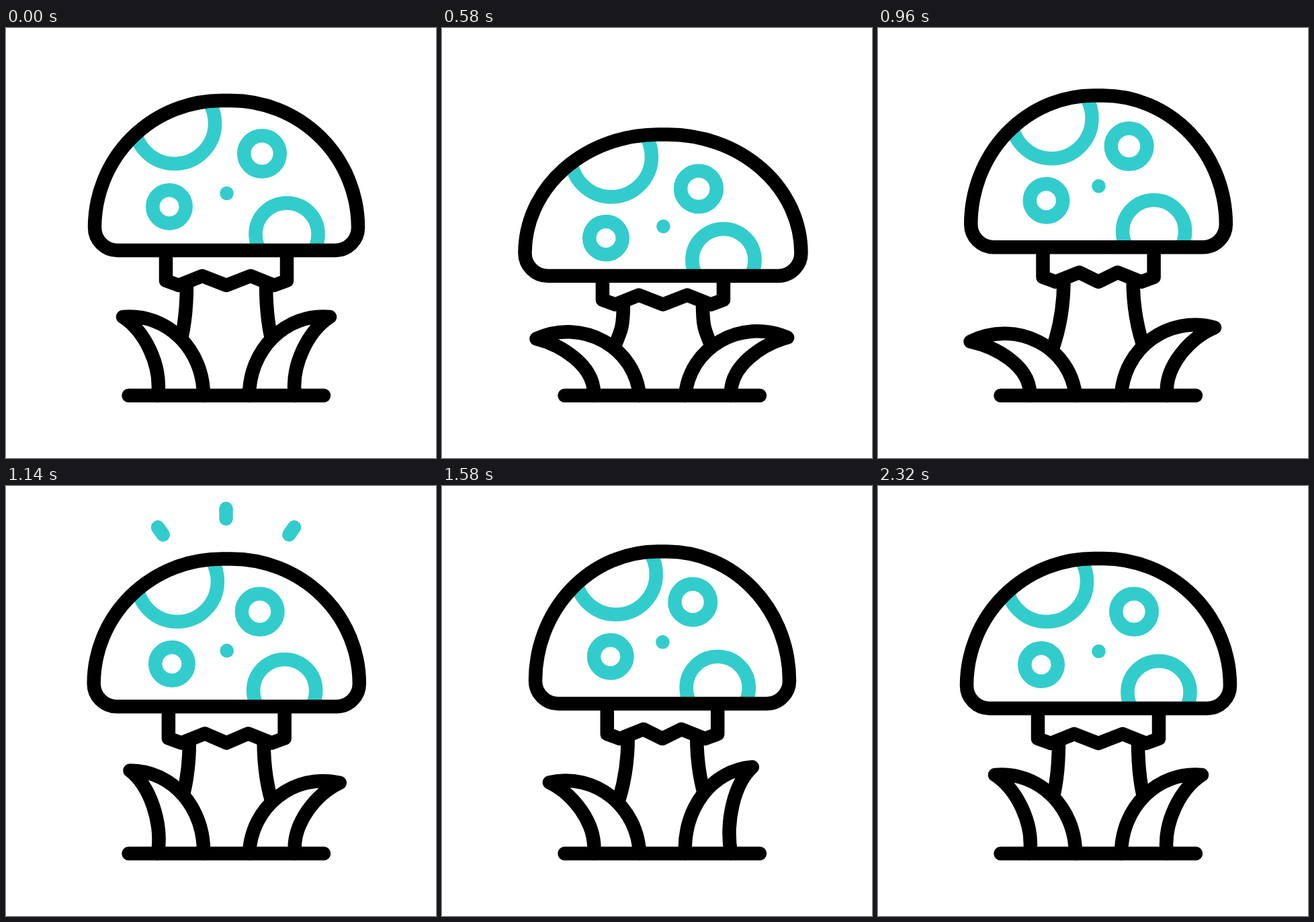
Animation, 640 px wide and 640 px high, one loop 2400 ms. Source, as an HTML page:

```html
<!DOCTYPE html>
<html lang="en">
<head>
<meta charset="utf-8">
<title>Bouncing mushroom</title>
<style>
  html, body { margin: 0; width: 100%; height: 100%; overflow: hidden; background: #fff; }
  svg { display: block; width: 100%; height: 100%; }
  .ink { fill: none; stroke: #000; stroke-width: 20.5; stroke-linecap: round; stroke-linejoin: round; }
  .solid { fill: #fff; }
  .teal { fill: none; stroke: #33cccc; stroke-width: 20.5; stroke-linecap: round; }
  .dot { fill: #33cccc; stroke: none; }
</style>
</head>
<body>
<svg viewBox="0 0 640 640">
  <defs><clipPath id="inside"><path id="clip"/></clipPath></defs>
  <g id="rays" class="teal"><path/><path/><path/></g>
  <path id="stem" class="ink"/>
  <path id="leafL" class="ink solid"/>
  <path id="leafR" class="ink solid"/>
  <path class="ink" d="M182.5 547H473"/>
  <path id="ring" class="ink solid"/>
  <path id="fill" fill="#fff"/>
  <g class="teal" clip-path="url(#inside)">
    <circle r="60"/><circle r="26.8"/><circle r="24.7"/><circle r="46.6"/><circle r="10.3" class="dot"/>
  </g>
  <path id="cap" class="ink"/>
</svg>
<script>
const LOOP = 2400, MID = 328, SIDES = [-1, 1];
const $ = id => document.getElementById(id);
const mix = (a, b, k) => a + (b - a) * k;
const draw = (el, d) => el.setAttribute('d', d);

// Eases in and out between [time, value] keys.
const keyed = (...keys) => t => {
  const i = keys.findIndex(k => k[0] > t);
  if (i < 1) return keys[i < 0 ? keys.length - 1 : 0][1];
  const [t0, a] = keys[i - 1], [t1, b] = keys[i];
  const u = (t - t0) / (t1 - t0);
  return mix(a, b, u * u * (3 - 2 * u));
};

// The body moves through rest, squash, stretch, landing, stretch, rest.
const BEATS = [200, 640, 1010, 1260, 1570, 1940];
const weight = (...on) => keyed(...BEATS.map((t, i) => [t, on.includes(i) ? 1 : 0]));
const squash = weight(1), stretch = weight(2, 4), land = weight(3);

// Leaf angles in degrees; the tips lag while settling.
const swayL = keyed([120, 0], [880, 28.7], [1140, -5], [1600, 7.3], [1980, -4], [2320, 0]);
const swayR = keyed([100, 0], [560, 18], [1140, 7.6], [1580, -9.4], [1980, -4], [2320, 0]);
const lag = keyed([1600, 0], [1980, 7.5], [2320, 0]);

// Ends of the rays, 0 near the cap and 1 far out.
const rayHead = keyed([1020, 0], [1230, 1]);
const rayTail = keyed([1040, 0], [1340, 1]);

const SPOTS = [[251, 142], [381, 187], [243, 266], [418, 307], [328.5, 246]];
const dots = document.querySelectorAll('circle');

// Turns a leaf point around the root.
function turn(x, y, deg, scale = 1) {
  const a = -deg * Math.PI / 180, dx = (x - 255) * scale, dy = (y - 547) * scale;
  return [255 + dx * Math.cos(a) - dy * Math.sin(a), 547 + dx * Math.sin(a) + dy * Math.cos(a)];
}

function leaf(el, sway, curl, flip) {
  const points = [
    [294, 547],
    turn(294, 479, sway * .3),
    turn(240, 424, sway * .75),
    turn(174, 430, sway + curl, 1 - curl / 150),
    turn(205, 450, sway),
    turn(232, 500, sway * .25),
    [226, 547]
  ].map(([x, y]) => [flip ? 2 * MID - x : x, y]);
  draw(el, `M${points[0]}C${points.slice(1, 4)}C${points.slice(4)}`);
}

function render(t) {
  const s = squash(t), p = stretch(t), l = land(t);
  const top = 108 + 53 * s - 10.5 * p + 10 * l;
  const bottom = 331 + 40 * s - 7 * p + l;
  const half = 196 + 10 * s - 7 * p + 9 * l;
  const drop = 30 * s - 7 * p + 5 * l;
  const inset = 7.8 * p;
  const cx = MID + s + l / 2;

  const r = 34, flat = 7, left = cx - half, right = cx + half, side = bottom - r;
  const arc = `A${half - flat} ${side - top} 0 0 1 `, corner = `A${r} ${r} 0 0 1 `;
  const cap = `M${left + r} ${bottom}${corner}${left} ${side}${arc}${cx - flat} ${top}`
    + `H${cx + flat}${arc}${right} ${side}${corner}${right - r} ${bottom}Z`;
  for (const id of ['cap', 'clip', 'fill']) draw($(id), cap);

  // Spots keep their share of the cap height; those halfway up bulge more.
  const bulge = 14 * s - 11 * p + 12 * l;
  SPOTS.forEach(([x, y], i) => {
    const f = (y - 108) / 223;
    const pull = Math.max(-1, Math.min(1, (MID - x) / 40));
    dots[i].setAttribute('cx', x + cx - MID + inset * pull);
    dots[i].setAttribute('cy', mix(top, bottom, f) + bulge * (4 * f * (1 - f) - .45));
  });

  const zig = k => [[90, bottom - drop], [90, 376], [71, 383], [36, 369]]
    .map(([d, y]) => [cx + k * (d - inset), y + drop]);
  draw($('ring'), 'M' + [...zig(-1), [cx, 383 + drop], ...zig(1).reverse()].join('L'));

  draw($('stem'), SIDES.map(k => {
    const x = (d, amount) => cx + k * (d - inset * amount);
    return `M${x(59, 1)} ${380 + drop}v0C${x(59, 1)} ${418 + drop} `
      + `${x(62, .5)} 450 ${x(72 + 3 * s, .4)} 480`;
  }).join(''));

  leaf($('leafL'), swayL(t), lag(t), false);
  leaf($('leafR'), swayR(t), lag(t), true);

  const head = rayHead(t), tail = rayTail(t);
  $('rays').style.display = head > tail ? '' : 'none';
  [-1, 0, 1].forEach((k, i) => {
    const at = u => [MID - .5 + k * mix(88, 110, u), k ? mix(81, 49, u) : mix(60, 17, u)];
    draw($('rays').children[i], `M${at(head)}L${at(tail)}`);
  });
}

const start = performance.now();
function tick() {
  render((performance.now() - start) % LOOP);
  requestAnimationFrame(tick);
}
tick();
</script>
</body>
</html>
```
